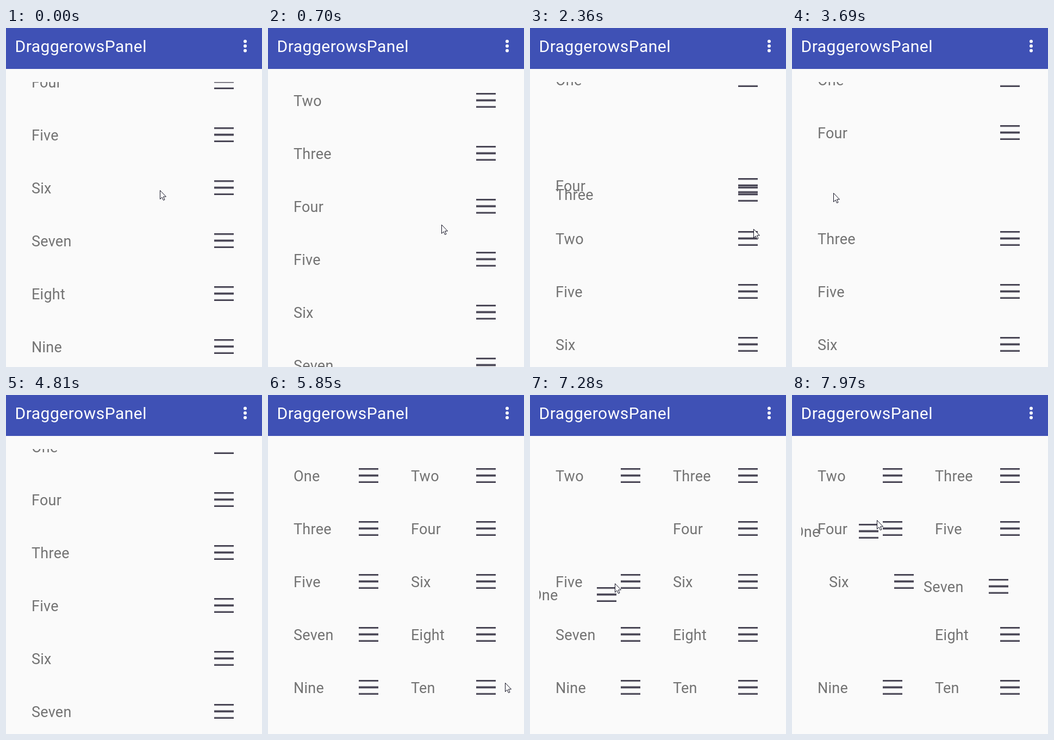
These frames come from a looping animation (471 px wide and 621 px high, 8 s). An HTML page:

```html
<!DOCTYPE html>
<html lang="en">
<head>
<meta charset="utf-8">
<title>Sortable list</title>
<style>
  html, body { margin: 0; width: 100%; height: 100%; overflow: hidden; background: #fafafa; }
  svg { display: block; width: 471px; height: 621px; }
  text { font-family: Roboto, "Noto Sans", sans-serif; }
  .row { font-size: 27px; fill: #737373; letter-spacing: .25px; }
  .title { font-size: 30px; fill: #fff; letter-spacing: .5px; }
</style>
</head>
<body>
<svg viewBox="0 0 471 621">
  <defs>
    <clipPath id="list"><rect x="17" y="99" width="432" height="522"/></clipPath>
    <linearGradient id="bars" x1="0" y1="0" x2="0" y2="1"></linearGradient>
  </defs>
  <rect width="471" height="621" fill="#fafafa"/>
  <g id="rows" clip-path="url(#list)"></g>
  <rect width="471" height="75" fill="#3f51b5"/>
  <text class="title" x="16.5" y="44">DraggerowsPanel</text>
  <g fill="#fff">
    <circle cx="440" cy="24.5" r="3"/><circle cx="440" cy="33" r="3"/><circle cx="440" cy="41.5" r="3"/>
  </g>
  <path id="cursor" d="M.5 .5V16.5L4 13L6.5 18.5L9 17.5L6.5 12H11.5Z" fill="#fff" stroke="#111122"/>
</svg>
<script>
const LOOP = 8000, STEP = 140, ROW = 97;
const GRID_AT = 5330, GRAB_AT = 6430;
const WORDS = ["One", "Two", "Three", "Four", "Five", "Six", "Seven", "Eight", "Nine", "Ten"];

// Places the pointer passes: time, x, y
const STOPS = [
  [120, 283, 297], [400, 290, 420], [1240, 405, 180], [1380, 412, 395], [1520, 415, 305],
  [2080, 412, 178], [2440, 411, 393], [3000, 390, 300], [3620, 76, 302], [4300, 456, 560], [4740, 471, 570],
  [5700, 437, 528], [6280, 205, 199], [GRAB_AT, 200, 127]
];

// Eased 0 to 1
function ease(t, start, length = 250) {
  const p = Math.min(1, Math.max(0, (t - start) / length));
  return .5 - Math.cos(p * Math.PI) / 2;
}

const mix = (a, b, p) => a + (b - a) * p;

// The screen updates in even steps
const snap = t => Math.max(0, 120 + Math.floor((t - 120) / STEP) * STEP);

function listSlot(i, t) {
  const closeGap = ease(t, 3690, 150);
  switch (i) {
    case 0: return 0;
    case 1: return 1 + 2.22 * ease(t, 1240, 280) - .22 * ease(t, 1520, 140) - ease(t, 2480);
    case 2: return 2 - ease(t, 1420) + 2.26 * ease(t, 2075, 560) - .26 * ease(t, 2640) - closeGap;
    case 3: return 3 - ease(t, 1470) - ease(t, 2370);
    default: return i - closeGap;
  }
}

function listPlace(i, t) {
  const swipe = i === 1 ? -432 * ease(t, 2950, 620) : 0;
  const scroll = -287 * (1 - ease(t, 50, 900));
  return { text: 47 + swipe, icon: 383 + swipe, y: 81 + ROW * listSlot(i, t) + scroll };
}

const cell = slot => [167 + 216 * (slot % 2), 134 + ROW * Math.floor(slot / 2)];

function gridPlace(i, t) {
  let [x, y] = cell(i);
  if (i === 0) {
    const back = Math.max(0, (t - 7700) / 260);
    x -= 44 * ease(t, GRAB_AT, 400);
    y += 345 * ease(t, 6640, 1060) - 243 * back ** 2.5;
  } else if (i < 7) {
    // Each row passed sends two cells one slot back
    const [toX, toY] = cell(i - 1);
    const p = ease(t, 6940 + 410 * Math.floor((i - 1) / 2));
    x = mix(x, toX, p);
    y = mix(y, toY, p);
  }
  return { text: x - 120, icon: x, y };
}

function pointer(t) {
  if (t >= GRAB_AT) {
    const held = gridPlace(0, t);
    return [held.icon + 33, held.y - 7];
  }
  const next = Math.max(1, STOPS.findIndex(s => s[0] > t));
  const [t0, x0, y0] = STOPS[next - 1], [t1, x1, y1] = STOPS[next];
  const p = ease(t, t0, t1 - t0);
  return [mix(x0, x1, p), mix(y0, y1, p)];
}

function make(name, parent, attrs) {
  const el = document.createElementNS("http://www.w3.org/2000/svg", name);
  for (const k in attrs) el.setAttribute(k, attrs[k]);
  return parent.appendChild(el);
}

// Three soft-edged bars
const bars = document.getElementById("bars");
for (let i = 0; i <= 54; i++) {
  const offset = i / 54;
  const gap = Math.min(...[.04, .5, .96].map(c => Math.abs(offset - c)));
  make("stop", bars, { offset, "stop-color": "#3d3a4a", "stop-opacity": Math.exp(-((gap / .075) ** 3)) });
}

const rowLayer = document.getElementById("rows");
const cursor = document.getElementById("cursor");
const rows = WORDS.map(word => {
  const label = make("text", rowLayer, { class: "row" });
  label.textContent = word;
  return { label, icon: make("rect", rowLayer, { width: 36, height: 27, fill: "url(#bars)" }) };
});

function draw(time) {
  const t = snap(time);
  const placeAt = time >= GRID_AT ? gridPlace : listPlace;
  rows.forEach((row, i) => {
    const place = placeAt(i, t), y = Math.round(place.y);
    row.label.setAttribute("x", Math.round(place.text));
    row.label.setAttribute("y", y + 24);
    row.icon.setAttribute("x", Math.round(place.icon));
    row.icon.setAttribute("y", y);
  });
  const [x, y] = pointer(t).map(Math.round);
  cursor.setAttribute("transform", `translate(${x} ${y})`);
  cursor.setAttribute("visibility", t >= 4740 && t < 5700 ? "hidden" : "visible");
}

const begin = performance.now();
function tick() {
  draw((performance.now() - begin) % LOOP);
  requestAnimationFrame(tick);
}
tick();
</script>
</body>
</html>
```
